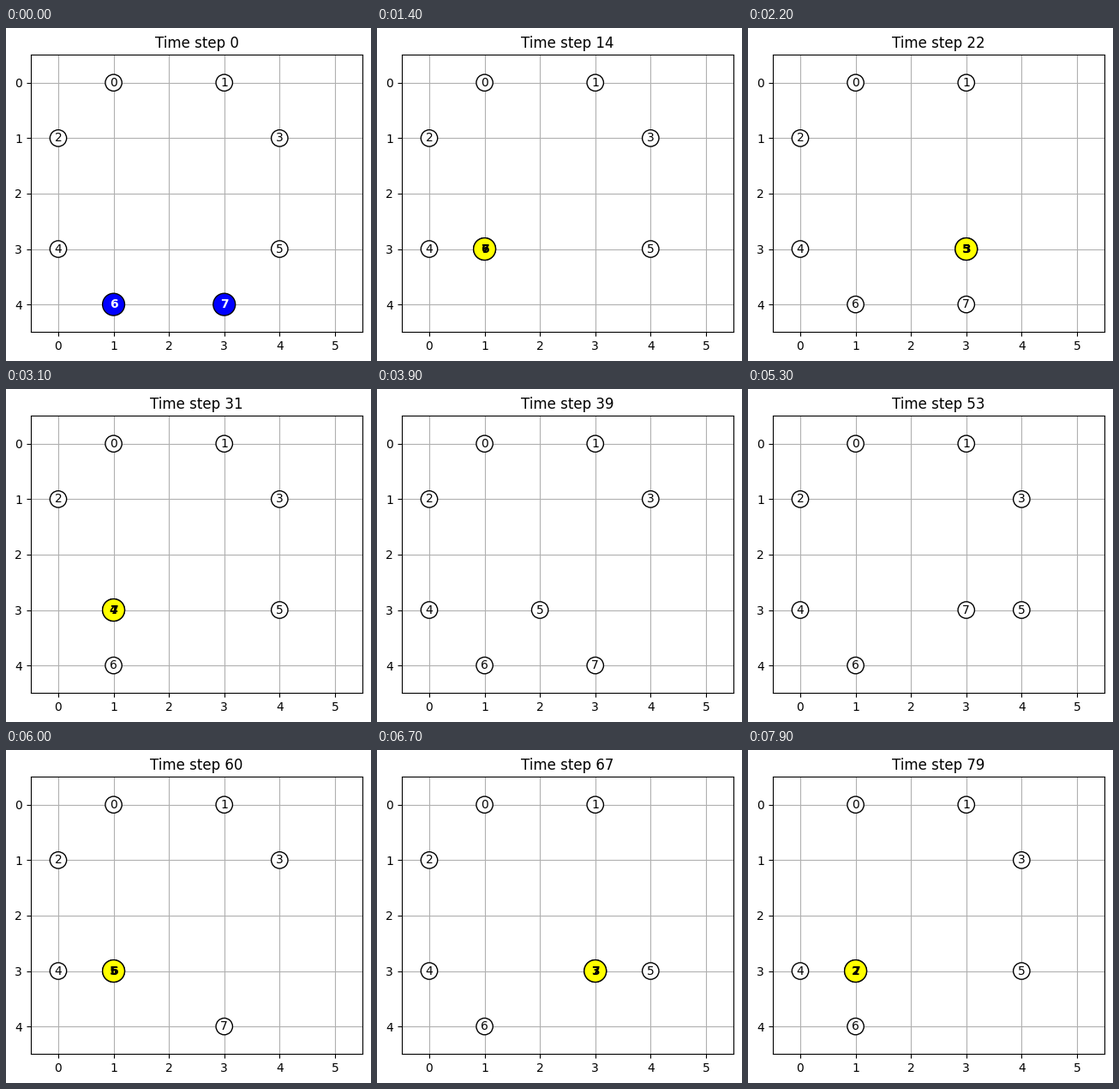
A matplotlib script for the animation above (8000 ms loop, 426 by 388 pixels).

```python
import matplotlib.pyplot as plt
from matplotlib.animation import FuncAnimation
from matplotlib.patches import Circle

W, H, DPI = 426, 388, 100
FRAMES, INTERVAL = 80, 100
HOMES = [(1, 0), (3, 0), (0, 1), (4, 1), (0, 3), (4, 3), (1, 4), (3, 4)]
LEFT, RIGHT = (1, 3), (3, 3)

# (pair, meeting cell, first step together, last step together)
MEETINGS = [
    ((6, 7), LEFT, -6, -3),
    ((6, 7), LEFT, 3, 6),
    ((6, 7), LEFT, 12, 15),
    ((3, 5), RIGHT, 21, 24),
    ((4, 7), LEFT, 31, 34),
    ((5, 6), LEFT, 40, 43),
    ((4, 7), LEFT, 48, 51),
    ((5, 6), LEFT, 57, 60),
    ((3, 7), RIGHT, 66, 69),
    ((2, 7), LEFT, 74, 80),
]
BACK = 3  # steps from parting until both are home again


def route(start, end):
    """Cells from start to end, vertical steps first."""
    (x, y), cells = start, [start]
    while (x, y) != end:
        if y != end[1]:
            y += 1 if end[1] > y else -1
        else:
            x += 1 if end[0] > x else -1
        cells.append((x, y))
    return cells


def state(agent, step):
    """Cell and mood of an agent at a time step."""
    home = HOMES[agent]
    for pair, spot, first, last in MEETINGS:
        if agent not in pair:
            continue
        cells = route(home, spot)
        dist = len(cells) - 1
        if step == last + BACK:
            return home, "done"
        if first <= step <= last:
            return spot, "meet"
        if first - dist < step < first:
            return cells[dist - (first - step)], "idle"
        if last < step < last + BACK:
            return cells[max(dist - (step - last), 0)], "idle"
    return home, "idle"


# mood: radius, fill, text colour, weight
STYLES = {
    "idle": (0.15, "white", "black", "normal"),
    "meet": (0.2, "yellow", "black", "bold"),
    "done": (0.2, "blue", "white", "bold"),
}

plt.rcParams["font.family"] = "DejaVu Sans"
fig = plt.figure(figsize=(W / DPI, H / DPI), dpi=DPI)
ax_w, ax_h = 387.5, 387.5 * 5 / 6
ax = fig.add_axes([28.7 / W, 33.6 / H, ax_w / W, ax_h / H])
ax.set_xlim(-0.5, 5.5)
ax.set_ylim(4.5, -0.5)
ax.set_xticks(range(6))
ax.set_yticks(range(5))
ax.grid(True)
title = ax.set_title("Time step 0")

discs, labels = [], []
for i, home in enumerate(HOMES):
    discs.append(ax.add_patch(Circle(home, 0.15, ec="black", lw=1, zorder=2.2)))
    labels.append(ax.text(*home, str(i), ha="center", va="center", zorder=3))


def update(step):
    title.set_text(f"Time step {step}")
    for i, (disc, label) in enumerate(zip(discs, labels)):
        cell, mood = state(i, step)
        radius, fill, ink, weight = STYLES[mood]
        disc.set_center(cell)
        disc.set_radius(radius)
        disc.set_facecolor(fill)
        label.set_position(cell)
        label.set_color(ink)
        label.set_fontweight(weight)
    return [title, *discs, *labels]


anim = FuncAnimation(fig, update, frames=FRAMES, interval=INTERVAL,
                     repeat=True, repeat_delay=0, blit=False)
plt.show()
```
